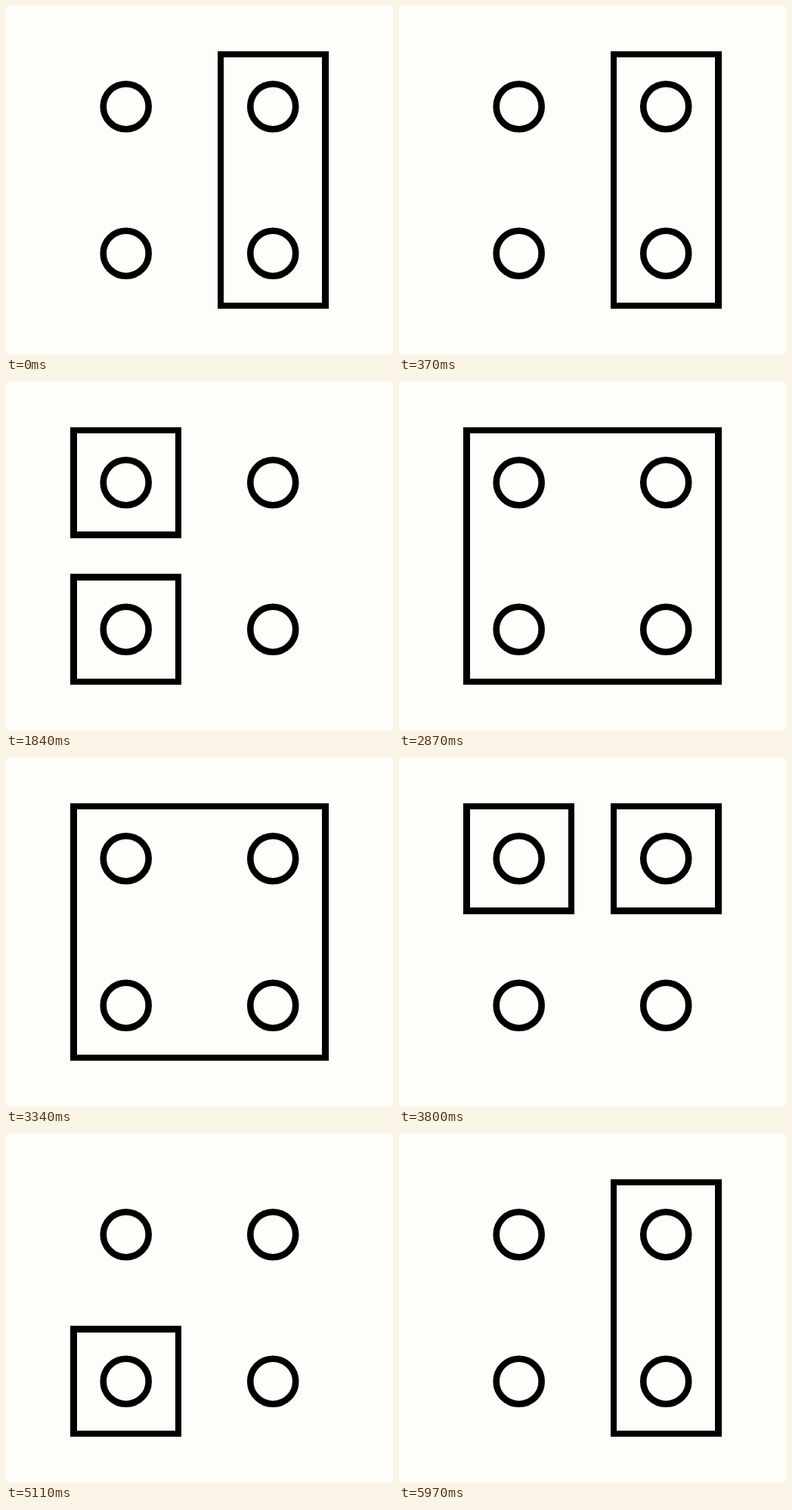
An HTML page with a canvas that plays this animation: 512x461 px, repeating every 6000 ms.

```html
<!DOCTYPE html>
<html>
<head>
<meta charset="utf-8">
<style>
html, body { margin: 0; width: 100%; height: 100%; overflow: hidden; background: #fdfdfa; }
canvas { display: block; }
</style>
</head>
<body>
<canvas id="stage" width="512" height="461"></canvas>
<script>
const ctx = document.getElementById('stage').getContext('2d');
const LOOP = 6000, HOLD = 600, LEAD = 200;
const LEFT = 158.7, TOP = 133.2, STEP = 194.5, HALF = 69.2, LINE = 8.6;

// Boxes around cells of the 2x2 grid: column, row, columns wide, rows high
const A = [0, 0, 1, 1], B = [1, 0, 1, 1], C = [0, 1, 1, 1], D = [1, 1, 1, 1];
const AB = [0, 0, 2, 1], CD = [0, 1, 2, 1], AC = [0, 0, 1, 2], BD = [1, 0, 1, 2];
const ALL = [0, 0, 2, 2];
const groups = [[BD], [B, D], [AB], [A, C], [A, CD], [ALL], [A, B], [AC], [C], [ALL]];

function ring(col, row) {
  ctx.beginPath();
  ctx.arc(LEFT + col * STEP, TOP + row * STEP, 30, 0, 2 * Math.PI);
  ctx.stroke();
}

// Both outlines of a box edge lie on whole pixels
function box([col, row, wide, high]) {
  ctx.beginPath();
  for (const reach of [HALF + LINE / 2, HALF - LINE / 2]) {
    const x = Math.round(LEFT + col * STEP - reach);
    const y = Math.round(TOP + row * STEP - reach);
    const right = Math.round(LEFT + (col + wide - 1) * STEP + reach);
    const bottom = Math.round(TOP + (row + high - 1) * STEP + reach);
    ctx.rect(x, y, right - x, bottom - y);
  }
  ctx.fill('evenodd');
}

function draw() {
  const time = performance.now() % LOOP;
  ctx.fillStyle = '#fdfdfa';
  ctx.fillRect(0, 0, 512, 461);
  ctx.fillStyle = ctx.strokeStyle = '#000';
  ctx.lineWidth = LINE;
  for (let i = 0; i < 4; i++) ring(i % 2, i >> 1);
  groups[Math.floor((time + LEAD) / HOLD) % groups.length].forEach(box);
  requestAnimationFrame(draw);
}
draw();
</script>
</body>
</html>
```
